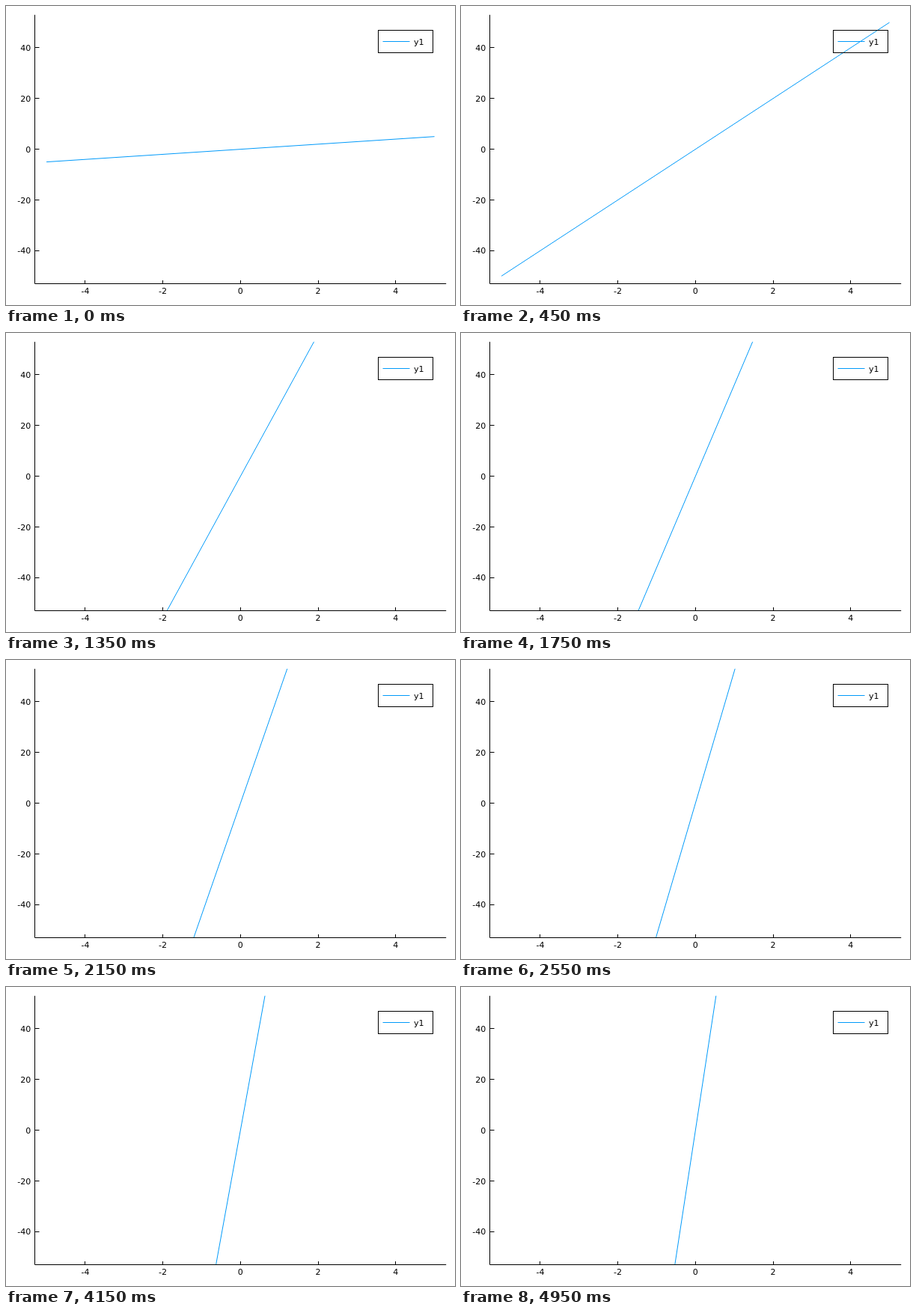
An HTML page for the animation above (5 s loop, 600 by 400 pixels).

```html
<!DOCTYPE html>
<html lang="en">
<head>
<meta charset="utf-8">
<title>Line with growing slope</title>
<style>
  html, body { margin: 0; width: 100%; height: 100%; overflow: hidden; background: #fff; }
  svg { display: block; width: 600px; height: 400px; }
  text { font: 11px "DejaVu Sans", sans-serif; fill: #000; }
  path, rect { fill: none; stroke: #000; stroke-width: 1; }
  .series { stroke: #009afa; }
</style>
</head>
<body>
<svg viewBox="0 0 600 400">
  <defs><clipPath id="plot"><rect x="38" y="11.8" width="550.5" height="359.7"/></clipPath></defs>
  <path id="line" class="series" clip-path="url(#plot)"/>
  <path id="axes"/>
  <g id="labels"></g>
  <rect x="497.5" y="32.5" width="73" height="30"/>
  <path class="series" d="M503.5 47.5H539.5"/>
  <text x="545" y="52">y1</text>
</svg>
<script>
const LOOP = 5000, STEP = 50, REACH = 5;
const LEFT = 38.5, RIGHT = 588.2, TOP = 11.8, BOTTOM = 371.5;
const byId = id => document.getElementById(id);
const px = x => 313.3 + 51.85 * x;
const py = y => 191.65 - 3.393 * y;
const snap = v => Math.floor(v) + 0.5;

function label(text, x, y, anchor) {
  const el = document.createElementNS("http://www.w3.org/2000/svg", "text");
  el.setAttribute("x", x);
  el.setAttribute("y", y);
  el.setAttribute("text-anchor", anchor);
  el.textContent = text;
  byId("labels").append(el);
}

function drawAxes() {
  let d = `M${LEFT} ${TOP}V${BOTTOM}H${RIGHT}`;
  for (let i = -2; i <= 2; i++) {
    const x = px(2 * i), y = py(20 * i);
    d += `M${snap(x)} ${BOTTOM}v-4.5M${LEFT} ${snap(y)}h6`;
    label(2 * i, x, 385, "middle");
    label(20 * i, 33.2, y + 4.1, "end");
  }
  byId("axes").setAttribute("d", d);
}

// The slope rises by one every step, from 1 to 100.
function draw(ms) {
  const slope = 1 + Math.floor((ms % LOOP) / STEP);
  const x = Math.min(REACH, 60 / slope), y = slope * x;
  byId("line").setAttribute("d", `M${px(-x)} ${py(-y)}L${px(x)} ${py(y)}`);
}

drawAxes();
draw(0);
const start = performance.now();
function tick() {
  draw(performance.now() - start);
  requestAnimationFrame(tick);
}
requestAnimationFrame(tick);
</script>
</body>
</html>
```
